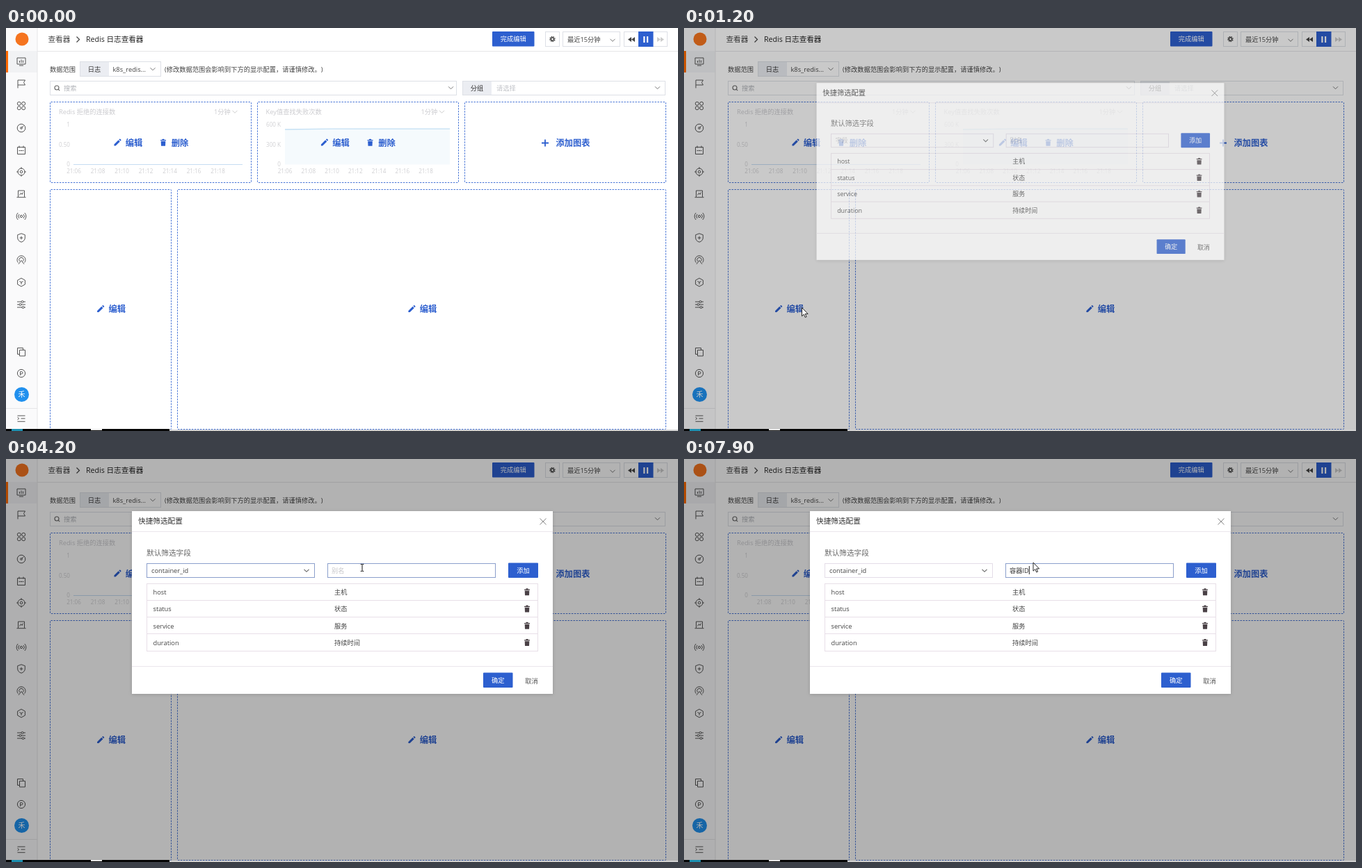
Recreate the animation shown at these times as an HTML page. Size 966 by 580 pixels, loop 8000 ms.

```html
<!DOCTYPE html>
<html lang="zh-CN">
<head>
<meta charset="utf-8">
<style>
html, body { margin: 0; width: 100%; height: 100%; overflow: hidden; background: #fff; }
svg { display: block; width: 966px; height: 580px; }
text {
  font-family: "Open Sans", "Noto Sans CJK SC", "Noto Sans CJK", sans-serif;
  white-space: pre; text-spacing-trim: space-all; font-kerning: none;
}
</style>
</head>
<body>
<svg id="stage" viewBox="0 0 966 580"></svg>
<script>
const BLUE = '#2d5fcf', EDGE = '#dde0e6', FIELD = '#e4dde8', FOCUS = '#8b9fcc', SIZE = 9.25;

// ---- drawing helpers, all return markup ----
const rect = (x, y, w, h, fill, more = '') =>
  `<rect x="${x}" y="${y}" width="${w}" height="${h}" fill="${fill}" ${more}/>`;
const box = (x, y, w, h, stroke = EDGE, fill = 'none', more = '') =>
  rect(x + .5, y + .5, w - 1, h - 1, fill, `stroke="${stroke}" ${more}`);
const line = (d, stroke = '#555', w = 1, more = '') =>
  `<path d="${d}" fill="none" stroke="${stroke}" stroke-width="${w}" ${more}/>`;
const shape = (d, x, y, fill) => `<path d="${d}" fill="${fill}" transform="translate(${x} ${y})"/>`;
const label = (x, cy, str, fill = '#444', size = SIZE, anchor = 'start', weight = 400, more = '') =>
  `<text x="${x}" y="${cy + size * .38}" fill="${fill}" font-size="${size}" text-anchor="${anchor}" font-weight="${weight}" ${more}>${str}</text>`;
const ring = (x, y, r) => `M${x - r} ${y}a${r} ${r} 0 1 0 ${2 * r} 0a${r} ${r} 0 1 0 ${-2 * r} 0`;
const chevron = (x, y, stroke = '#777') => line(`M${x - 3.5} ${y - 1.7}l3.5 3.5 3.5-3.5`, stroke);
const button = (x, y, w, h, str) =>
  rect(x, y, w, h, BLUE, 'rx="1"') + label(x + w / 2, y + h / 2, str, '#fff', SIZE, 'middle', 500);

const TRASH = 'M-4-4h2.2l.6-1.2h2.4l.6 1.2H4v1.3H-4ZM-3.3-1.9H3.3L3 4.8H-3Z';
const PENCIL = 'M-4.6 4.6V2.4L1.6-3.8 3.8 -1.6-2.4 4.6ZM2.3-4.5l.9-.8q.6-.4 1.1.1l1 1q.5.5 0 1l-.8.9Z';
const action = (icon, x, y, str) =>
  shape(icon, x, y, BLUE) + label(x + 11.7, y, str, BLUE, 12.3, 'start', 700);

const menuIcons = [
  [48, 'M-6-5H6V4H-6ZM-3 6H3M-2.5 2V-1M0 2V-2.5M2.5 2V-1.5'],
  [80, 'M-5 6.5V-5H5.5L3.5-1.5 5.5 2H-5'],
  [112, ring(-3.2, -3.2, 2.5) + ring(3.2, -3.2, 2.5) + ring(-3.2, 3.2, 2.5) + ring(3.2, 3.2, 2.5)],
  [144, ring(0, 0, 5.8) + ring(0, 0, 1.3) + 'M1-1L3.3-3.3'],
  [176, 'M-5.5-4.5H5.5V5.5H-5.5ZM-3-6.5v3M3-6.5v3M-3.5 .5h2M-1 .5h2M1.5 .5h2'],
  [207, ring(0, 0, 5) + ring(0, 0, 1.8) + 'M0-6.8V-4M0 6.8V4M-6.8 0H-4M6.8 0H4'],
  [239, 'M-4.5 4V-5H4.5V4M-6.5 4.7H6.5M-2.5 1.5 -.5-1.5 1 .5 2.5-2.5'],
  [271, ring(0, 0, 1.6) + 'M-3-3a4.3 4.3 0 0 0 0 6M3-3a4.3 4.3 0 0 1 0 6M-4.8-5a7 7 0 0 0 0 10M4.8-5a7 7 0 0 1 0 10'],
  [302, 'M0-6.2 5.3-4.3V0Q5.3 4.2 0 6.2Q-5.3 4.2-5.3 0V-4.3ZM0-2.3V2.3M-2.3 0H2.3'],
  [334, 'M-4.6 3.6A6 6 0 1 1 4.6 3.6M-2.4 1.6a3.2 3.2 0 1 1 4.8 0M-4 5.8 0 .5 4 5.8'],
  [366, 'M0-6 5.4-3V3L0 6-5.4 3V-3ZM-2.6-1.5 0 0 2.6-1.5M0 0V3'],
  [398, 'M-6-4H0M3-4H6M-6 0H-3M0 0H6M-6 4H1M4 4H6' + ring(1.5, -4, 1.5) + ring(-1.5, 0, 1.5) + ring(2.5, 4, 1.5)],
  [466, 'M2.5-2.5V-5.5H-5.5V3.5H-2.5M-2.5-2.5H5.5V6H-2.5Z'],
  [497, ring(0, 0, 5.6) + 'M-1.4 3V-2.4H.4a1.6 1.6 0 0 1 0 3.2H-1'],
  [562, 'M-5.5-4H5.5M-.5 0H5.5M-5.5 4.3H5.5M-5.5-1.8l2.2 1.8-2.2 1.8']
];

function sidebar() {
  return rect(0, 0, 45, 580, '#fafafb') + rect(0, 33, 45, 31, '#f1f2f4') + rect(0, 33, 3, 31, '#ff6a00') +
    line('M45 0V580M0 547.5H45', '#e6e6e8') + '<circle cx="23" cy="16" r="9.5" fill="#f5741f"/>' +
    menuIcons.map(([y, d]) => line(d, '#555', 1, `transform="translate(22 ${y})"`)).join('') +
    '<circle cx="22.5" cy="527.5" r="10.5" fill="#2090ee"/>' + label(22.5, 527.5, '禾', '#fff', 10, 'middle', 500);
}

function header() {
  return line('M45 33.5H966', '#e6e6e8') + label(60.5, 16, '查看器', '#444', 10.6) +
    line('M101.5 12.5l4 4-4 4', '#444', 1.2) + label(115, 16, 'Redis 日志查看器', '#222', 10.6) +
    button(699, 5, 60.5, 21.5, '完成编辑') +
    box(775, 5, 21, 22) + line(ring(785.5, 16, 2.2), '#444', 1.6) +
    line(ring(785.5, 16, 3.6), '#444', 1.2, 'stroke-dasharray="1.6 1.2"') +
    box(800, 5, 83, 22) + label(807, 16.5, '最近15分钟') + chevron(872, 17.5) +
    box(888, 5, 63, 22) + shape('M0-3.5V3.5L-5 0ZM5-3.5V3.5L0 0Z', 899, 16.5, '#444') +
    rect(909, 5, 21.5, 22, BLUE) + rect(916.3, 12, 2.2, 9, '#fff') + rect(921, 12, 2.2, 9, '#fff') +
    shape('M0-3.5V3.5L5 0ZM-5-3.5V3.5L0 0Z', 941, 16.5, '#ccc');
}

function filters() {
  return label(63, 59.5, '数据范围') + rect(106, 49, 42, 20.5, '#ebedf2') + box(106, 48, 117, 22) +
    label(127, 59.5, '日志', '#333', SIZE, 'middle') + label(153.5, 59.5, 'k8s_redis...') + chevron(211, 59) +
    label(228, 59.5, '(修改数据范围会影响到下方的显示配置，请谨慎修改。)') +
    box(63, 76, 585, 21) + line(ring(73, 86, 3) + 'M75.2 88.2l2 2', '#666', 1.1) +
    label(83, 86.5, '搜索', '#b0b3b8') + chevron(639.5, 86) +
    rect(656, 76, 42, 21, '#ebedf2') + box(656, 76, 292, 21) +
    label(677, 86.5, '分组', '#333', SIZE, 'middle') + label(705, 86.5, '请选择', '#c0c3c8') + chevron(936.5, 86);
}

const tick = (x, y, str, anchor = 'end') => label(x, y, str, '#cfcfd2', 8.1, anchor);
const hours = (x0, step, from, n) => Array.from({ length: n }, (_, i) =>
  tick(x0 + i * step, 205.5, '21:' + String(from + 2 * i).padStart(2, '0'), 'middle')).join('');

function chart(x, title, right, marks) {
  return label(x, 120.5, title, '#cbcbcf') + label(x + 223, 120.5, '1分钟', '#cbcbcf') + chevron(x + 253, 120.5, '#ccc') +
    marks.map((m, i) => tick(right, 139 + 28.5 * i, m)).join('') +
    action(PENCIL, x + 84, 165, '编辑') + action(TRASH, x + 150, 165, '删除');
}

function panels() {
  return [[63, 106, 290, 117], [361, 106, 290, 117], [659, 106, 290, 117], [63, 232, 175, 346], [246, 232, 703, 346]]
    .map(r => box(...r, '#4472d6', 'none', 'rx="1" stroke-dasharray="2.4 1.6"')).join('') +
    line('M97 196.5H340', '#c6dcf2') + chart(76, 'Redis 拒绝的连接数', 92, ['1', '0.50', '0']) +
    '<path d="M401 146 520 145H638V196.5H401Z" fill="#f5fafd"/>' + line('M401 146 470 145.2H638', '#c4e0f4', 1.3) +
    chart(373.5, 'Key值查找失败次数', 395, ['600 K', '300 K', '0']) + hours(401, 33.75, 6, 7) +
    line('M770 165.5h10M775 160.5v10', BLUE, 1.8) + label(790.5, 165, '添加图表', BLUE, 12.25, 'start', 700) +
    action(PENCIL, 135.7, 404.5, '编辑') + action(PENCIL, 583, 404.5, '编辑');
}

const rows = [['host', '主机'], ['status', '状态'], ['service', '服务'], ['duration', '持续时间']];
const fields = ['stream', 'container_name', 'date_ns', 'container_type', 'create_time', 'container_id', 'host_ip'];

function dialog() {
  return rect(181, 75, 605, 263, '#fff', 'filter="url(#soft)"') +
    label(190, 89, '快捷筛选配置', '#333', 10.65) + line('M767.5 85.5l9 9M776.5 85.5l-9 9', '#888') +
    line('M181 104.5H786M181 298.5H786', '#ebe6ec') + label(202, 134.5, '默认筛选字段', '#666', 10.65) +
    box(202, 150, 242, 21, FIELD, '#fff', 'id="select"') + label(209, 160.5, '', '#444', SIZE, 'start', 400, 'id="picked"') +
    `<g id="arrow">${line('M-3.5 -1.7l3.5 3.5 3.5-3.5', '#666', 1.1)}</g>` +
    box(462, 150, 242, 21, FIELD, '#fff', 'id="input"') + label(468, 160.5, '', '#444', SIZE, 'start', 400, 'id="alias"') +
    line('M0 154V166', '#222', 1, 'id="caret"') + button(722, 149.5, 43, 21.5, '添加') +
    box(202, 179, 563, 98, '#e8dfe8') + line('M202 203.5H765M202 227.5H765M202 251.5H765', '#e8dfe8') +
    rows.map(([name, alias], i) => {
      const y = 191.5 + 24.25 * i;
      return label(211.5, y, name) + label(472, y, alias) + shape(TRASH, 749, y, '#4a4146');
    }).join('') +
    button(686, 307.5, 42.5, 21.5, '确定') + label(755.5, 319, '取消', '#555', SIZE, 'middle') +
    `<g id="list">${rect(202, 175, 242, 151.5, '#fff', 'filter="url(#soft)"')}<g clip-path="url(#listClip)">` +
    fields.map((f, i) => label(214, 190.5 + 22.6 * i, f)).join('') +
    `</g>${rect(438.5, 175, 5.5, 137, '#c2c2c4', 'rx="2.7"')}</g>`;
}

const pointers = {
  arrow: '<path d="M0 0V12.2l2.8-2.6 1.9 4.3 1.9-.8-1.9-4.2H8.6Z" fill="#fff" stroke="#111" stroke-width=".9"/>',
  hand: '<path d="M-1.5 1.2c0-1.8 2.7-1.8 2.7 0v4.3l4.2.8c1.4.3 2 .9 1.9 2.2l-.6 4.3-1.6 2.4v2H-2v-1.9L-5.3 10.5c-.9-1.5.4-2.5 1.7-1.5l2.1 1.9Z" fill="#fff" stroke="#222"/>',
  beam: line('M-2.2-5H-.6L0-4.4.6-5H2.2M0-4.4V4.4M-2.2 5H-.6L0 4.4.6 5H2.2', '#111')
};

const stage = document.getElementById('stage');
stage.innerHTML = `<defs>
  <filter id="soft" x="-10%" y="-10%" width="120%" height="125%"><feDropShadow dx="0" dy="1" stdDeviation="2.5" flood-opacity=".16"/></filter>
  <clipPath id="listClip"><rect x="202" y="175" width="242" height="151"/></clipPath></defs>` +
  rect(0, 0, 966, 580, '#fff') + sidebar() + header() + filters() + panels() + '<g id="hours"></g>' +
  rect(0, 0, 966, 580, '#000', 'id="shade"') +
  rect(235, 578, 731, 2, '#d0d0d0') + rect(0, 577, 235, 3, '#050505') +
  rect(8, 577, 16, 3, '#1c8fb0') + rect(122, 577, 16, 2, '#e8e8e8') +
  `<g id="dialog">${dialog()}</g><g id="ime"></g><g id="pointer"></g>`;

const $ = id => document.getElementById(id);
const el = Object.fromEntries(
  ['hours', 'shade', 'dialog', 'select', 'picked', 'arrow', 'input', 'alias', 'caret', 'list', 'ime', 'pointer'].map(id => [id, $(id)]));

// ---- timeline ----
const path = [
  [200, 706, 128, 'arrow'], [300, 610, 185], [500, 360, 330], [600, 255, 385], [700, 190, 402],
  [800, 167, 404, 'hand'], [1100, 167, 404, 'arrow'], [1300, 172, 401], [1500, 215, 330], [1800, 312, 143],
  [2100, 284, 160, 'hand'], [2400, 284, 160], [2600, 290, 190], [2800, 290, 214], [2900, 290, 214],
  [3200, 250, 297], [3300, 269, 285], [3400, 269, 285], [3500, 262, 282], [3600, 262, 282],
  [3700, 262, 298], [3800, 285, 285, 'arrow'], [4000, 410, 210], [4200, 512, 156.5, 'beam'],
  [4400, 512, 156.5], [4500, 502, 149, 'arrow']
];
// time, alias text, start of the composed part (-1: none), candidate window width, candidates
const typing = [
  [0, '', -1], [5100, 'r', 0, 473, '人 让 如 日 然 入 热'], [5300, 'ro', 0, 473, '容 荣 融 肉 柔 软 若'],
  [5400, 'rong', 0, 473, '容 荣 融 溶 绒 熔 榕'], [5600, "rong'q", 0, 443, '容器 融洽 荣 容 融 溶 绒'],
  [5700, "rong'qi", 0, 391, '容器 荣 容 融 溶 绒 熔'], [5900, '容器', 0], [6000, '容器', -1],
  [6800, '容器I', 2, 63, 'I i'], [7200, '容器ID', 2, 73, 'ID id'], [7500, '容器ID', 2], [7600, '容器ID', -1]
];
const opening = [[0, 0], [1000, .03], [1100, .2], [1200, .7], [1300, 1]];
const listFade = [[0, 0], [2300, 1], [3700, .7], [3800, .2], [3900, 0]];
const arrowTurn = [[0, 0], [2300, 45], [2400, 140], [2500, 180], [3700, 120], [3800, 30], [3900, 0]];

const at = (table, t) => table.findLast(k => k[0] <= t);
const within = (t, a, b) => t >= a && t < b;

function drawPointer(t) {
  const i = path.findLastIndex(k => k[0] <= t);
  if (i < 0) return el.pointer.innerHTML = '';
  const a = path[i], b = path[i + 1] || a, f = a === b ? 0 : (t - a[0]) / (b[0] - a[0]);
  const kind = path.slice(0, i + 1).findLast(k => k[3])[3];
  el.pointer.innerHTML = pointers[kind];
  el.pointer.setAttribute('transform', `translate(${a[1] + (b[1] - a[1]) * f} ${a[2] + (b[2] - a[2]) * f})`);
}

function drawTyping(t) {
  const [, str, start, width, words] = at(typing, t);
  el.alias.textContent = str || '别名';
  el.alias.setAttribute('fill', str ? '#333' : '#c4c4c8');
  const end = 468 + (str ? el.alias.getComputedTextLength() : 0) + .5;
  el.caret.setAttribute('transform', `translate(${end} 0)`);
  el.caret.style.display = within(t, 4400, 4900) || within(t, 5100, 6400) || t >= 6800 ? '' : 'none';
  const x = start > 0 ? 484 : 466;
  let ime = start < 0 ? '' : line(`M${start > 0 ? 487 : 468} 166.5H${end}`, '#444', 1, 'stroke-dasharray="1 1"');
  if (width) {
    const list = words.split(' ');
    ime += box(x, 172, width, 30, '#c8c8c8', '#fff') + list.map((w, i) =>
      label(x + 8 + i * (width - 8) / list.length, 187, `${i + 1} ${w}`, i ? '#333' : BLUE, 10.5)).join('');
  }
  el.ime.innerHTML = ime;
}

function render(t) {
  const p = at(opening, t)[1], s = 1 - .106 * (1 - p), fade = at(listFade, t)[1];
  el.shade.setAttribute('opacity', .3 * p);
  el.dialog.setAttribute('opacity', p);
  el.dialog.setAttribute('transform', `translate(483.5 206.5) scale(${s}) translate(-483.5 -206.5)`);
  el.list.setAttribute('opacity', fade);
  el.arrow.setAttribute('transform', `translate(432 160.5) rotate(${at(arrowTurn, t)[1]})`);
  el.select.setAttribute('stroke', within(t, 2000, 4500) ? FOCUS : FIELD);
  el.input.setAttribute('stroke', t >= 4200 ? FOCUS : FIELD);
  el.picked.textContent = t >= 3700 ? 'container_id' : '字段';
  el.picked.setAttribute('fill', t >= 3700 ? '#444' : '#c4c4c8');
  el.hours.innerHTML = t >= 7900 ? hours(115, 34.5, 8, 7) : hours(97.5, 34.5, 6, 7);
  drawTyping(t);
  drawPointer(t);
}

let shown = -1;
const origin = performance.now();
function loop() {
  const t = Math.floor((performance.now() - origin) % 8000 / 100) * 100;
  if (t !== shown) render(shown = t);
  requestAnimationFrame(loop);
}
render(0);
loop();
</script>
</body>
</html>
```
